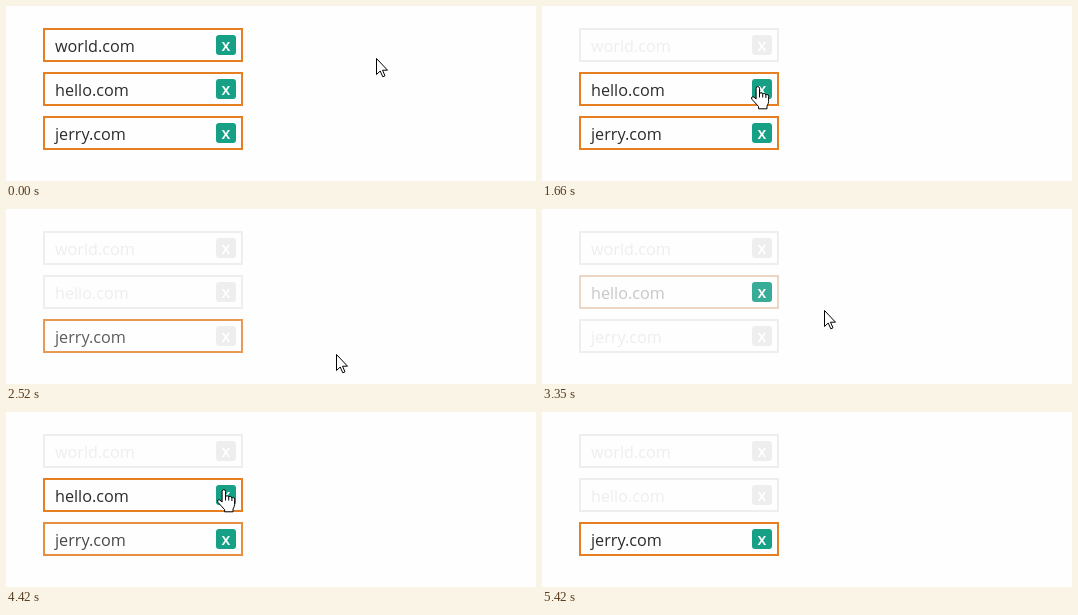
An HTML page that plays this animation: 530 by 175 pixels, repeating every 5.48 s.

```html
<!DOCTYPE html>
<html lang="en">
<head>
<meta charset="utf-8">
<style>
  html, body { margin: 0; width: 100%; height: 100%; overflow: hidden; background: #fefefe; }
  svg { display: block; }
  text { font-family: "Open Sans", "Noto Sans", sans-serif; }
  .cursor path { fill: #fff; stroke: #000; stroke-linejoin: round; }
</style>
</head>
<body>
<svg width="530" height="175" viewBox="0 0 530 175">
  <g id="rows"></g>
  <g class="cursor" id="arrow">
    <path d="M.5 .5V16.5L4.2 13L6.8 18.8L9 17.8L6.5 12.2H11.5Z"/>
  </g>
  <g class="cursor" id="hand">
    <path d="M-.9 13V2.4Q-.9 .6 .8 .6T2.5 2.4V8Q2.7 6.7 4.1 6.7T5.7 8.4Q6 7.4 7.2 7.4T8.9 9.2Q9.2 8.5 10.2 8.5Q11.6 8.5 11.6 10.4V15.5Q11.6 17.5 10 20V22.8H1.6V20.6L-4.8 13.6Q-6.2 11.8-5 10.9Q-3.6 10-.9 13Z"/>
    <path d="M2.5 8V11.5M5.7 8.4V11.5M8.9 9.2V12"/>
  </g>
</svg>
<script>
const LOOP = 5480, FADE = 500, BUTTON_FADE = 120, PAUSE = 30, PITCH = 44;
const OFF = [238, 238, 238], ORANGE = [230, 126, 34], INK = [44, 44, 44], GREEN = [22, 160, 133];
const HOME = [370, 52];

// Each leg: click the row (if any), pause, then travel along a curve bent towards "via"
const legs = [
  { at: 0, ms: 500, via: [240, 14], to: [224, 41] },
  { at: 780, row: 0, ms: 700, via: [365, 95], to: [215, 80] },
  { at: 1850, row: 1, ms: 450, via: [283, 100], to: [220, 129] },
  { at: 2395, row: 2, ms: 545, via: [470, 177], to: [225, 81] },
  { at: 3250, row: 1, ms: 480, via: [370, 123], to: [220, 129] },
  { at: 3995, row: 2, ms: 380, via: [266, 20], to: [217, 77] },
  { at: 4550, row: 1, ms: 320, via: [270, 40], to: [398, 152] }
];

const $ = id => document.getElementById(id);
const clamp = v => Math.max(0, Math.min(1, v));
const mix = (on, k) =>
  `rgb(${on.map((c, i) => Math.round(OFF[i] + (c - OFF[i]) * k))})`;

function add(tag, attrs, label = "") {
  const el = document.createElementNS("http://www.w3.org/2000/svg", tag);
  for (const key in attrs) el.setAttribute(key, attrs[key]);
  el.textContent = label;
  $("rows").append(el);
  return el;
}

const rows = ["world.com", "hello.com", "jerry.com"].map((name, i) => {
  const y = 22 + i * PITCH;
  const row = {
    box: add("rect", { x: 38, y: y + 1, width: 198, height: 32, fill: "#fefefe", "stroke-width": 2 }),
    label: add("text", { x: 49, y: y + 24, "font-size": 16.2 }, name),
    button: add("rect", { x: 210, y: y + 7, width: 20, height: 20, rx: 3 })
  };
  add("text", {
    x: 220, y: y + 23, "font-size": 16, "font-weight": 600,
    "text-anchor": "middle", fill: "#fff"
  }, "x");
  return row;
});

function drawRow(row, i, t) {
  let on = true, k = 1, buttonOn = 1;
  for (const leg of legs) {
    if (leg.row !== i || t < leg.at) continue;
    on = !on;
    const p = clamp((t - leg.at) / FADE);
    k = on ? p : 1 - p;
    buttonOn = on ? clamp((t - leg.at) / BUTTON_FADE) : 0;
  }
  row.box.setAttribute("stroke", mix(ORANGE, k));
  row.label.setAttribute("fill", mix(INK, k));
  row.button.setAttribute("fill", mix(GREEN, buttonOn));
}

function pointerAt(t) {
  const n = legs.findLastIndex(leg => leg.at <= t);
  const { at, ms, via, to } = legs[n];
  const from = n ? legs[n - 1].to : HOME;
  const q = (1 - clamp((t - at - PAUSE) / ms)) ** 2;
  const p = 1 - q;
  return from.map((v, i) => Math.round(q * q * v + 2 * q * p * via[i] + p * p * to[i]));
}

function drawPointer(t) {
  const [x, y] = pointerAt(t);
  const last = legs.at(-1);
  const present = t < last.at + PAUSE + last.ms;
  const over = x >= 210 && x < 230 && rows.some((_, i) => Math.abs(y - 39 - i * PITCH) <= 10);
  for (const id of ["arrow", "hand"]) {
    const shown = present && (id === "hand") === over;
    $(id).setAttribute("visibility", shown ? "visible" : "hidden");
    $(id).setAttribute("transform", `translate(${x} ${y})`);
  }
}

const begin = performance.now();
function frame() {
  const t = (performance.now() - begin) % LOOP;
  rows.forEach((row, i) => drawRow(row, i, t));
  drawPointer(t);
  requestAnimationFrame(frame);
}
frame();
</script>
</body>
</html>
```
